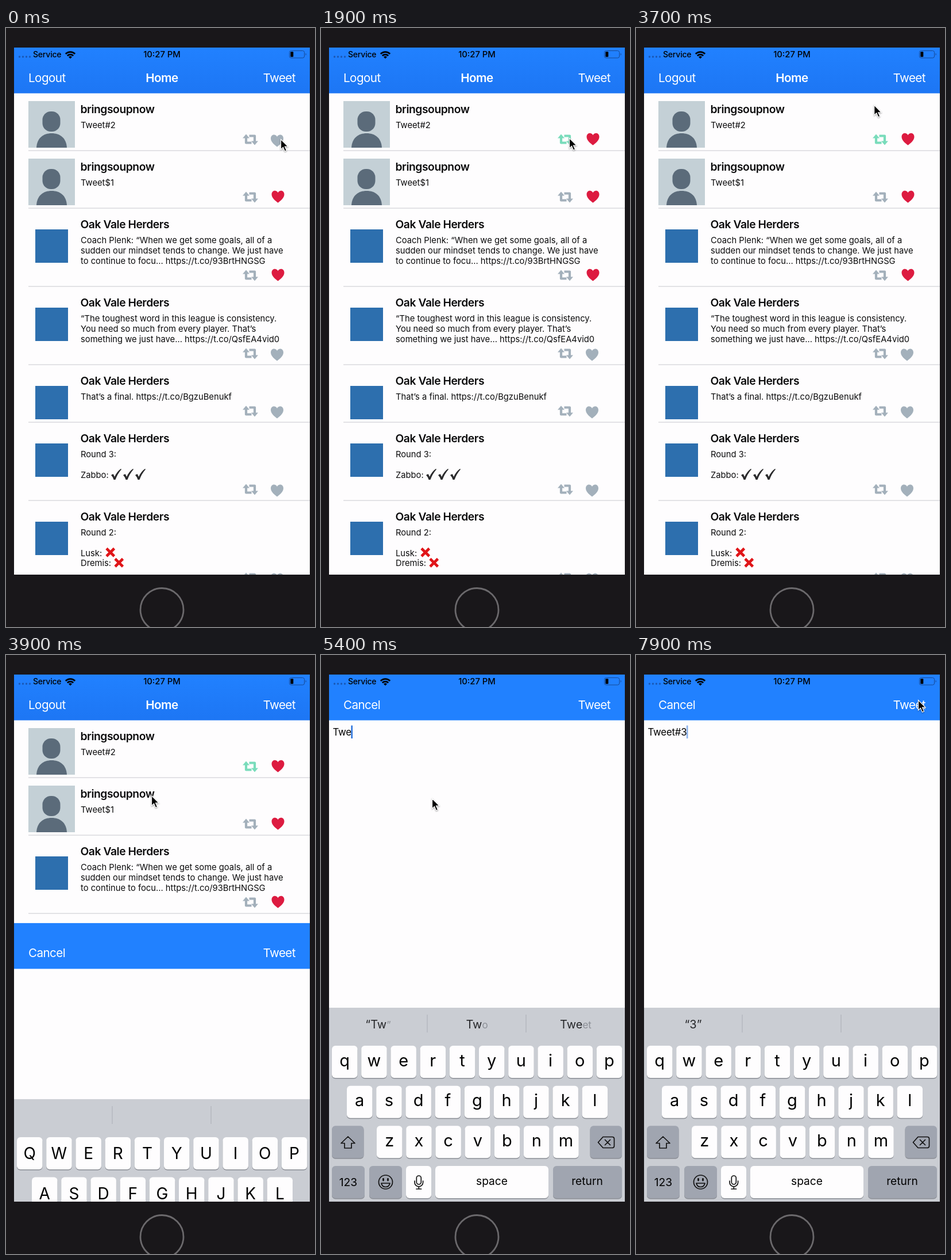
An HTML page for the animation above (8 s loop, 538 by 1041 pixels).

```html
<!DOCTYPE html>
<html lang="en">
<head>
<meta charset="utf-8">
<title>Home timeline</title>
<style>
  html, body { margin: 0; width: 100%; height: 100%; overflow: hidden; background: #19171a; }
  svg { display: block; width: 538px; height: 1041px; }
  text { font-family: Inter, "Open Sans", sans-serif; white-space: pre; }
  .mid { text-anchor: middle; }
  .end { text-anchor: end; }
  .status { font-size: 14.8px; font-weight: 500; }
  .network { font-size: 14px; letter-spacing: -.2px; }
  .nav { font-size: 20.6px; letter-spacing: -.55px; fill: #fff; }
  .bold { font-weight: 600; }
  .name { font-size: 19.3px; font-weight: 600; letter-spacing: -.45px; fill: #0b0b0c; }
  .body { font-size: 14.75px; fill: #0b0b0c; }
  .draft { font-size: 16.8px; letter-spacing: -.2px; }
  .upper { font-size: 28px; }
  .lower { font-size: 29px; }
  .label { font-size: 19.2px; }
  .hint { font-size: 20px; fill: #26272a; }
  .tail { font-size: 17px; fill: #8d9097; }
  .line { fill: none; stroke: #111; stroke-width: 1.7; stroke-linejoin: round; stroke-linecap: round; }
</style>
</head>
<body>
<svg viewBox="0 0 538 1041">
  <defs>
    <clipPath id="screen"><rect x="14" y="34" width="515" height="916"/></clipPath>
    <linearGradient id="bar" x2="0" y2="1">
      <stop stop-color="#2181ff"/><stop offset="1" stop-color="#1d76f4"/>
    </linearGradient>
    <g id="person">
      <rect width="81" height="81" fill="#c4d0d6"/>
      <rect x="24.5" y="18" width="31" height="35" rx="14.5" fill="#5b6b7a"/>
      <path d="M14 81C15 64 26 56 40.500 56S66 64 67 81Z" fill="#5b6b7a"/>
    </g>
    <rect id="badge" x="12" y="23" width="57" height="58" fill="#2d6fae"/>
    <g id="repost">
      <path d="M-7.500-4V5.500H2M-2-6.500H7.500V4" fill="none" stroke="currentColor" stroke-width="4.200" stroke-linejoin="round"/>
      <path d="M-13.500-2.500L-7.500-9.500L-1.500-2.500ZM1.500 2.500L7.500 9.500L13.500 2.500Z" fill="currentColor"/>
    </g>
    <path id="heart" fill="currentColor" d="M0 10.500C-4 7.500-11 2-11-4C-11-8-8.500-10.500-5.500-10.500C-3-10.500-1-9 0-7C1-9 3-10.500 5.500-10.500C8.500-10.500 11-8 11-4C11 2 4 7.500 0 10.500Z"/>
    <path id="check" fill="#2b2b2d" d="M0 11L3.500 9Q5 11 6 14Q10 5 17 0L18 1Q11 9 7.500 19H4.500Q3 14 0 11Z"/>
    <path id="cross" d="M2 2L15.500 15.500M15.500 2L2 15.500" stroke="#e01519" stroke-width="4.600"/>
    <path id="arrow" d="M0-10L12 1.500H6V10H-6V1.500H-12Z"/>
  </defs>

  <rect width="538" height="1041" fill="#19171a"/>
  <circle cx="271.500" cy="1011" r="37.500" fill="none" stroke="#6b696c" stroke-width="2.800"/>

  <g clip-path="url(#screen)">
    <rect x="14" y="34" width="515" height="916" fill="#fefdfe"/>
    <g id="feed"></g>
    <rect x="14" y="34" width="515" height="79.500" fill="url(#bar)"/>
    <text class="nav" x="39" y="93.500">Logout</text>
    <text class="nav bold mid" x="271.500" y="93.500">Home</text>
    <text class="nav end" x="504" y="93.500">Tweet</text>

    <g id="sheet">
      <rect x="14" y="34" width="515" height="940" fill="#fefdfe"/>
      <rect x="14" y="34" width="515" height="79.500" fill="#2181ff"/>
      <text class="nav" x="39" y="93.500">Cancel</text>
      <text class="nav end" x="504" y="93.500">Tweet</text>
      <text id="draft" class="draft" x="20.500" y="140"></text>
      <rect id="caret" y="122.500" width="2.600" height="22.500" fill="#2d74dc"/>
    </g>
    <rect id="backdrop" x="14" y="34" width="515" height="13" fill="#2181ff"/>
    <g id="keyboard"></g>

    <g fill="#1a58b5">
      <circle cx="23.500" cy="50" r="1.700"/><circle cx="29.500" cy="50" r="1.700"/>
      <circle cx="35.500" cy="50" r="1.700"/><circle cx="41.500" cy="50" r="1.700"/>
    </g>
    <text class="status network" x="47" y="51.300">Service</text>
    <g fill="none" stroke="#000" stroke-width="2.700">
      <path d="M103.800 45A11.500 11.500 0 0 1 120.200 45M106.800 48.300A7.500 7.500 0 0 1 117.200 48.300"/>
      <path d="M109 50.200Q112 48 115 50.200L112 53.300Z" fill="#000" stroke="none"/>
    </g>
    <text class="status mid" x="271.500" y="51.300">10:27 PM</text>
    <rect x="493.500" y="39.500" width="26" height="12.500" rx="3" fill="none" stroke="#174a94"/>
    <rect x="495.300" y="41.300" width="5" height="9" rx="1" fill="#000"/>
    <path d="M521.500 43.500Q524 45.700 521.500 48Z" fill="#174a94"/>
  </g>

  <path id="pointer" d="M0 0V17.500L4 13.800L7 20.800L10 19.500L7 12.700H12.500Z" stroke="#fff" stroke-width="1.200" style="filter:drop-shadow(0 1px 1px #0006)"/>
</svg>
<script>
const LOOP = 8000;
const GRAY = '#a3b0bb', RED = '#dd1b40', GREEN = '#79dcbb';
const $ = id => document.getElementById(id);
const text = (cls, x, y, s) => `<text class="${cls}" x="${x}" y="${y}">${s}</text>`;
const use = (id, x, y, attrs = '') => `<use href="#${id}" x="${x}" y="${y}" ${attrs}/>`;

// Timeline rows
const USER = 'bringsoupnow', TEAM = 'Oak Vale Herders';
const rows = [
  { name: USER, lines: ['Tweet#2'] },
  { name: USER, lines: ['Tweet$1'], liked: true },
  { name: TEAM, liked: true, lines: ['Coach Plenk: “When we get some goals, all of a',
    'sudden our mindset tends to change. We just have', 'to continue to focu... https://t.co/93BrtHNGSG'] },
  { name: TEAM, lines: ['“The toughest word in this league is consistency.',
    'You need so much from every player. That’s', 'something we just have... https://t.co/QsfEA4vid0'] },
  { name: TEAM, lines: ['That’s a final. https://t.co/BgzuBenukf'] },
  { name: TEAM, lines: ['Round 3:', '', 'Zabbo:'],
    marks: [183, 204, 225].map(x => use('check', x, 766)) },
  { name: TEAM, lines: ['Round 2:', '', 'Lusk:', 'Dremis:'],
    marks: [use('cross', 173, 902.5), use('cross', 188, 920.5)] },
];

const heartPlace = liked => ({ x: liked ? 473.5 : 472, dy: liked ? -19.8 : -17 });
const rowHeight = lineCount => lineCount === 1 ? 100 : 82.6 + 17.75 * lineCount;

let rowTop = 113;
$('feed').innerHTML = rows.map((row, i) => {
  const y = rowTop;
  const bottom = Math.round(y + rowHeight(row.lines.length));
  const heart = heartPlace(row.liked);
  rowTop = bottom;
  return use(row.name === USER ? 'person' : 'badge', 39, y + 14) +
    text('name', 129.5, y + 35, row.name) +
    row.lines.map((s, n) => text('body', 130, y + 61 + n * 17.75, s)).join('') +
    (row.marks || []).join('') +
    use('repost', 425.5, bottom - 19, `id="repost${i}" color="${GRAY}"`) +
    use('heart', heart.x, bottom + heart.dy, `id="heart${i}" color="${row.liked ? RED : GRAY}"`) +
    `<path d="M39 ${bottom + .2}H529" stroke="#d3d3d8" stroke-width="1.3"/>`;
}).join('');

// Keyboard
const key = (x, y, w, fill = '#fefdfe', id = '') =>
  `<rect x="${x}" y="${y + 1.5}" width="${w}" height="56" rx="6" fill="#8b8e95"/>
   <rect x="${x}" y="${y}" width="${w}" height="56" rx="6" fill="${fill}" ${id && `id="${id}"`}/>`;
const DARK = '#a0a5b0', PITCH = 51.2;
const letterRows = [['qwertyuiop', 19, 679], ['asdfghjkl', 45, 748.7], ['zxcvbnm', 97, 818.3]];
const caps = letterRows.map(([s, x]) => [...s].map((_, i) => x + i * PITCH));
const letters = (cls, dy, map) => letterRows.map(([s, , y], r) =>
  [...s].map((c, i) => text(cls + ' mid', caps[r][i] + 22.2, y + dy, map(c))).join('')).join('');

$('keyboard').innerHTML = `
  <rect x="14" y="613" width="515" height="345" fill="#cacdd3"/>
  <path d="M185 625V656M357 625V656" stroke="#b2b5bc" stroke-width="1.3"/>
  <g id="hints"></g>` +
  letterRows.map(([, , y], r) => caps[r].map(x => key(x, y, 44.5)).join('')).join('') +
  `<g id="upper">${letters('upper', 38.5, c => c.toUpperCase())}</g>` +
  `<g id="lower">${letters('lower', 35.5, c => c)}</g>` +
  key(19, 818.3, 55.5, DARK, 'shiftKey') + key(468.5, 818.3, 55.5, DARK) +
  key(19, 888, 57, DARK) + key(84, 888, 57, DARK) + key(148, 888, 44) +
  key(199, 888, 197) + key(404, 888, 120, DARK) +
  use('arrow', 47, 847, 'id="shift" class="line"') + `
  <path class="line" d="M482.500 847L491 837.500H507Q510.500 837.500 510.500 841V853Q510.500 856.500 507 856.500H491ZM494.500 842.500L503.500 851.500M503.500 842.500L494.500 851.500"/>
  <g class="line">
    <circle cx="112.500" cy="916" r="12"/>
    <path d="M105 918H120Q118.500 924.500 112.500 924.500T105 918Z"/>
    <path d="M108.500 910.500V913M116.500 910.500V913" stroke-width="2.800"/>
    <rect x="166.300" y="905" width="8" height="15" rx="4"/>
    <path d="M163 914V916.500A7.300 7.300 0 0 0 177.600 916.500V914M170.300 924V928M166 928H174.600"/>
  </g>` +
  text('label mid', 47.5, 923, '123') + text('label mid', 297.5, 921, 'space') +
  text('label mid', 463.5, 921, 'return');

// Script: time of each state, held until the next
const drafts = [[0, ''], [4000, ''], [5100, 'T'], [5250, 'Tw'], [5400, 'Twe'],
  [5600, 'Twee'], [5800, 'Tweet'], [7300, 'Tweet#'], [7500, 'Tweet#3']];
// The part after "|" is still fading in
const hints = [[0], [5200, '“T”', 'The', 'This'], [5400, '“Tw|”', 'Tw|o', 'Twe|et'],
  [5500, '“Twe”', 'Tweet', 'Twelve'], [5700, '“Twee”', 'Tweet', 'Tweed'],
  [5900, '“Tweet”', 'Tweets', 'Tweeted'], [7400], [7600, '“3”']];
const moves = [[0, 478.5, 193.5], [700, 478.5, 193.5], [1300, 432.5, 191.5], [2200, 432.5, 191.5],
  [2900, 472.5, 94.5], [3600, 472.5, 94.5], [3900, 253.5, 244.5], [4100, 213.5, 255.5],
  [4500, 193.5, 249.5], [7300, 193.5, 249.5], [7850, 491.5, 78.5], [LOOP, 491.5, 78.5]];

const current = (list, t) => list.findLast(([at]) => at <= t);
const clamp = v => Math.min(1, Math.max(0, v));
const ease = p => p * p * (3 - 2 * p);

function pointerAt(t) {
  const i = moves.findIndex(([at]) => at > t);
  const [t0, x0, y0] = moves[i - 1], [t1, x1, y1] = moves[i];
  const e = ease((t - t0) / (t1 - t0));
  return [x0 + (x1 - x0) * e, y0 + (y1 - y0) * e];
}

// Critically damped spring, 1 -> 0
function sheetOffset(t) {
  const s = Math.max(0, t - 3824) * .023;
  return (1 + s) * Math.exp(-s);
}

let shownHints;
function showHints(state) {
  if (state === shownHints) return;
  shownHints = state;
  $('hints').innerHTML = state.slice(1).map((s, i) => {
    const [head, tail = ''] = s.split('|');
    return text('hint mid', 99.5 + i * 172, 648.5, `${head}<tspan class="tail">${tail}</tspan>`);
  }).join('');
}

function setHeart(liked) {
  const { x, dy } = heartPlace(liked), heart = $('heart0');
  heart.setAttribute('x', x);
  heart.setAttribute('y', 213 + dy);
  heart.setAttribute('color', liked ? RED : GRAY);
}

function draw(t) {
  setHeart(t >= 400);
  $('repost0').setAttribute('color', t >= 1600 ? GREEN : GRAY);

  const k = sheetOffset(t);
  $('sheet').setAttribute('transform', `translate(0 ${916 * k})`);
  $('backdrop').style.display = k < .015 ? '' : 'none';
  $('keyboard').setAttribute('transform', `translate(0 ${337 * k})`);

  const [typedAt, draft] = current(drafts, t);
  $('draft').textContent = draft;
  $('caret').setAttribute('x', draft ? 20 + $('draft').getComputedTextLength() : 18.7);
  const beat = (t - typedAt) % 1000;
  const glow = beat < 700 ? 1 - clamp((beat - 320) / 180) : clamp((beat - 750) / 150);
  $('caret').setAttribute('opacity', t < 4000 ? 0 : glow);

  const isUpper = !draft;
  $('upper').style.display = isUpper ? '' : 'none';
  $('lower').style.display = isUpper ? 'none' : '';
  $('shiftKey').setAttribute('fill', isUpper ? '#fefdfe' : DARK);
  $('shift').style.fill = isUpper ? '#000' : 'none';
  showHints(current(hints, t));

  $('pointer').setAttribute('transform', `translate(${pointerAt(t)})`);
}

function tick() {
  draw(performance.now() % LOOP);
  requestAnimationFrame(tick);
}
tick();
</script>
</body>
</html>
```
